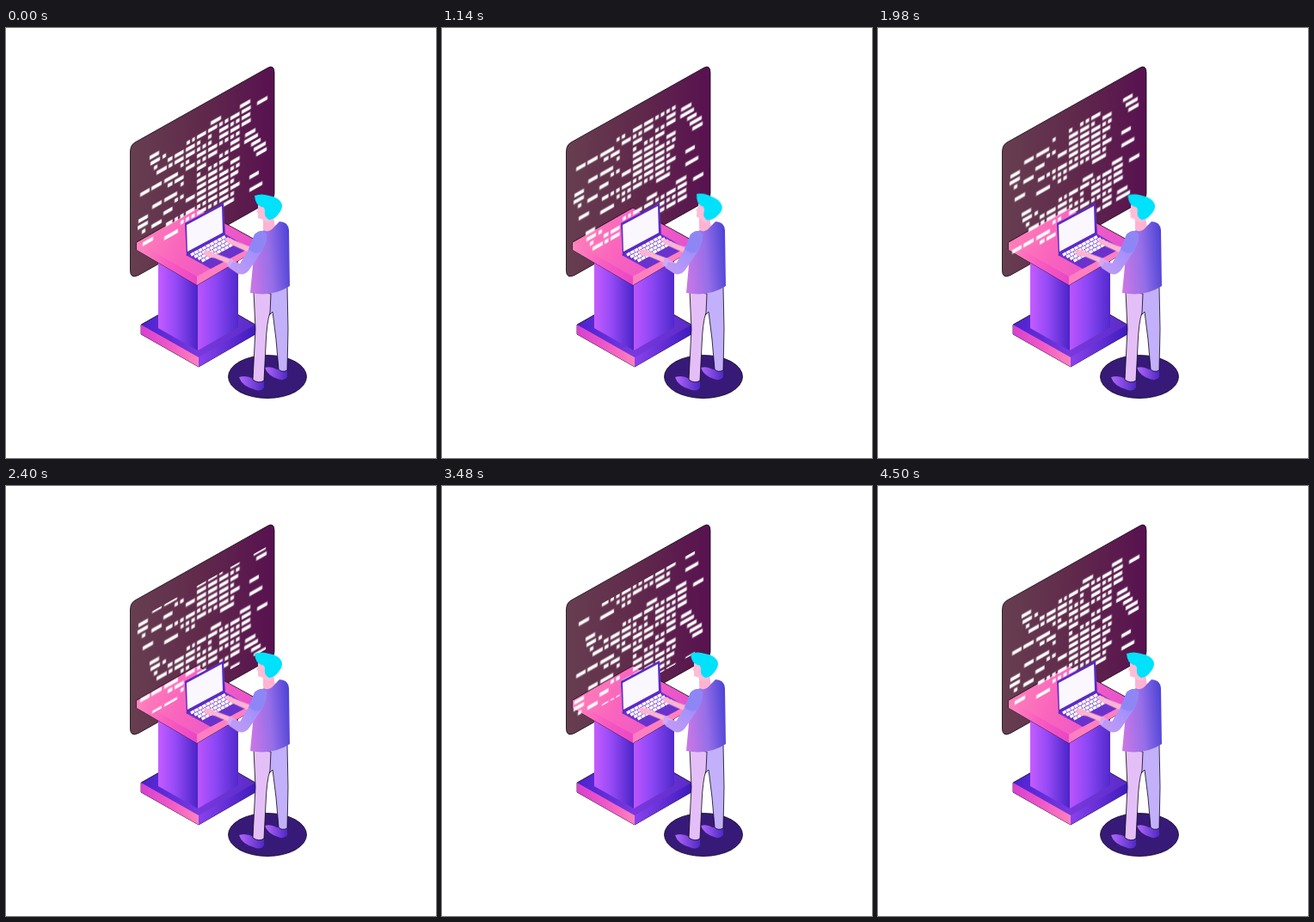
These frames come from a looping animation (500x500 px, 4560 ms). An HTML page:

```html
<!DOCTYPE html>
<html lang="en">
<head>
<meta charset="utf-8">
<title>Developer at a code wall</title>
<style>
html, body { margin: 0; width: 100%; height: 100%; overflow: hidden; background: #fff; }
svg { display: block; width: 100vw; height: 100vh; }
.outline { stroke: #0c0614; stroke-width: .8; }
#scroll { animation: scroll 4560ms linear infinite; }
#head { transform-origin: 305px 235px; animation: nod 4560ms ease-in-out infinite; }
.near, .far { animation: type 760ms ease-in-out infinite; }
.far { animation-delay: -380ms; }
@keyframes scroll {
  from { transform: translateY(0); }
  99.34%, to { transform: translateY(-118px); }
}
@keyframes nod {
  0%, 4% { transform: rotate(0deg); }
  15%, 32% { transform: rotate(10deg); }
  49%, to { transform: rotate(0deg); }
}
@keyframes type {
  0%, to { transform: translate(0, .6px); }
  50% { transform: translate(-1px, -.8px); }
}
</style>
</head>
<body>
<svg viewBox="0 0 500 500">
  <defs>
    <linearGradient id="wall"><stop stop-color="#673e50"/><stop offset=".5" stop-color="#60294b"/><stop offset="1" stop-color="#581150"/></linearGradient>
    <linearGradient id="desk" x1="0" y1=".3" x2="1" y2=".6"><stop stop-color="#ff82b8"/><stop offset=".4" stop-color="#f964bd"/><stop offset="1" stop-color="#e44fd0"/></linearGradient>
    <linearGradient id="edge"><stop stop-color="#ff86bc"/><stop offset=".5" stop-color="#f95cc0"/><stop offset="1" stop-color="#ea45c8"/></linearGradient>
    <linearGradient id="left"><stop stop-color="#c45cff"/><stop offset=".45" stop-color="#9349f5"/><stop offset="1" stop-color="#4a24c8"/></linearGradient>
    <linearGradient id="right"><stop stop-color="#bb55ff"/><stop offset=".45" stop-color="#8b47f4"/><stop offset="1" stop-color="#5029cc"/></linearGradient>
    <linearGradient id="base"><stop stop-color="#4a22d0"/><stop offset=".5" stop-color="#7a38de"/><stop offset="1" stop-color="#5a2bc8"/></linearGradient>
    <linearGradient id="foot"><stop stop-color="#d83fd0"/><stop offset=".5" stop-color="#ef58c6"/><stop offset="1" stop-color="#ff82bc"/></linearGradient>
    <linearGradient id="side"><stop stop-color="#8a42ee"/><stop offset="1" stop-color="#3d1bbd"/></linearGradient>
    <linearGradient id="shirt" x1="0" y1=".6" x2="1" y2=".45"><stop stop-color="#c877e6"/><stop offset=".5" stop-color="#976fe8"/><stop offset="1" stop-color="#4f45d6"/></linearGradient>
    <linearGradient id="sleeve" x1="1" y1="0" x2="0" y2="1"><stop stop-color="#8d80f4"/><stop offset=".5" stop-color="#a893fa"/><stop offset="1" stop-color="#c79cf4"/></linearGradient>
    <linearGradient id="shoe"><stop stop-color="#b266fa"/><stop offset="1" stop-color="#4e28c6"/></linearGradient>
    <clipPath id="view"><rect x="150" y="160" width="157" height="119"/></clipPath>
  </defs>

  <path class="outline" fill="url(#wall)" d="M150 133L304 46.500Q312 42 312 52V192Q312 199 306 202L154 287.500Q144.500 292 144.500 282V144Q144.500 136 150 133Z"/>

  <g id="stand">
    <path class="outline" fill="url(#base)" d="M157 345L224 307L290 345V356L224 394L157 356Z"/>
    <path fill="url(#foot)" d="M157 345L224 383V394L157 356Z"/>
    <path fill="url(#side)" d="M224 383L290 345V356L224 394Z"/>
    <path fill="url(#left)" d="M177 268L223 294V375L177 349Z"/>
    <path fill="url(#right)" d="M223 294L270 268V348L223 375Z"/>
    <path class="outline" fill="url(#desk)" d="M152 249L222 209L293 248V257L222 299L152 258Z"/>
    <path fill="url(#edge)" d="M152 249L222 289V299L152 258Z"/>
    <path fill="#ff7fc0" d="M222 289L293 248V257L222 299Z"/>
  </g>

  <g transform="matrix(1 -.566 0 1 0 82.07)">
    <g clip-path="url(#view)">
      <g id="scroll" fill="#fff">
        <g id="code"></g>
        <use href="#code" y="118"/>
      </g>
    </g>
  </g>

  <g id="laptop">
    <path fill="#6a32cc" d="M209 264L254 239L283 256L238 280Z"/>
    <path fill="#5a2bc4" d="M208 227L253 203L255 240L210 265Z"/>
    <path fill="#faf7ff" d="M210 229L251 207L252 238L211 260Z"/>
    <g id="keys" stroke="#fff" stroke-width="3.400" stroke-dasharray="4.500 .6"></g>
  </g>

  <ellipse class="outline" cx="304" cy="405.500" rx="45.500" ry="25" fill="#371a78"/>

  <g id="man">
    <g class="far">
      <path fill="#ffb3d2" d="M255 246Q260 243 265 247L289 257L286 263L264 253L258 250Z"/>
    </g>
    <path fill="url(#shoe)" d="M301 395Q308 393 315 397L327 396V406Q323 411 316 408Q304 404 301 395Z"/>
    <path fill="url(#shoe)" d="M271 406Q279 403 288 408L300 410V418Q296 424 288 420Q274 416 271 406Z"/>
    <path class="outline" fill="#c3b0fa" d="M305 306L327 300L328 350L327 398Q321 401 317 397L314 362L310 330L306 334Z"/>
    <path class="outline" fill="#e4bff7" d="M288 306L308 309L307 331Q303 342 302 370L300 410Q294 414 287 409L290 350Z"/>
    <path fill="#ffb3d2" d="M299 220H311L313 232Q305 240 299 234Z"/>
    <path fill="url(#shirt)" d="M300 235Q306 239 313 230L318 225Q328 225 329 235L330 300Q310 313 284 308L287 276L291 240Z"/>
    <g class="near">
      <path fill="#ffb3d2" d="M229 260Q236 256 242 261L264 269L262 275L243 267L233 265Z"/>
      <path fill="#d3a8f2" d="M260 268L275 275L271 286L257 276Z"/>
    </g>
    <path fill="url(#sleeve)" d="M289 240Q298 232 303 240Q304 248 298 259L283 281Q278 288 271 286L260 279L263 272L272 274L284 254Z"/>
    <path fill="#8f86f6" d="M289 240Q298 232 303 240Q304 248 297 260Q289 264 282 257Z"/>

    <g id="head">
      <path fill="#ffbcd6" d="M293 205L311 204L310 224Q304 229 299 223L293 221V215L291 214L293 211Z"/>
      <path fill="#00e1fb" d="M289 195Q297 192 306 195Q317 197 320 203Q323 209 317 216Q312 223 306 223Q300 220 301 213Q301 208 297 208Q290 206 289 195Z"/>
    </g>
  </g>
</svg>
<script>
const make = (parent, tag, attrs) => {
  const el = document.createElementNS('http://www.w3.org/2000/svg', tag);
  for (const key in attrs) el.setAttribute(key, attrs[key]);
  document.getElementById(parent).append(el);
};

let seed = 11;
const random = () => (seed = (seed * 16807) % 2147483647) / 2147483647;

// Each code line lists the start and end of its runs of words.
const lines = [
  [167, 178, 238, 250, 272, 284],
  [168, 179, 182, 186, 210, 285, 292, 304],
  [172, 176, 188, 284],
  [175, 187, 189, 286],
  [203, 273],
  [156, 167, 169, 181, 184, 200, 208, 246, 249, 272, 278, 290],
  [188, 272, 277, 293],
  [203, 272, 285, 296],
  [170, 181, 184, 199, 208, 272, 288, 302],
  [154, 165, 196, 272, 291, 303],
  [153, 165, 183, 270],
  [158, 162, 169, 181, 203, 272],
  [186, 272, 283, 294],
  [159, 171, 203, 265],
  [184, 200, 203, 246, 249, 265, 283, 298],
  []
];
const rowGap = 118 / lines.length, column = 13, space = 2.4;

function word(x, end, row) {
  make('code', 'rect', { x, y: 161.4 + row * rowGap, width: end - x, height: 4.3 });
}

// Long runs break at shared columns, with some short words and blanks.
function run(start, end, row) {
  if (end - start < 18) return word(start, end, row);
  for (let x = start; x < end - 2;) {
    const stop = Math.floor((x - 157) / column + 1) * column + 157;
    const next = Math.min(stop - space, end);
    const kind = random(), wide = next - x > 9;
    if (wide && kind < .3) {
      word(x, x + 4, row);
      if (kind < .2) word(x + 4 + space, next, row);
    } else if (next - x > 2 && kind < .88) {
      word(x, next, row);
    }
    x = next + space;
  }
}

lines.forEach((line, row) => {
  for (let i = 0; i < line.length; i += 2) run(line[i], line[i + 1], row);
});

for (let i = 0; i < 4; i++) {
  const x = 215 + i * 4.2, y = 264 + i * 2.3;
  make('keys', 'line', { x1: x, y1: y, x2: x + 40, y2: y - 21.5 });
}
</script>
</body>
</html>
```
